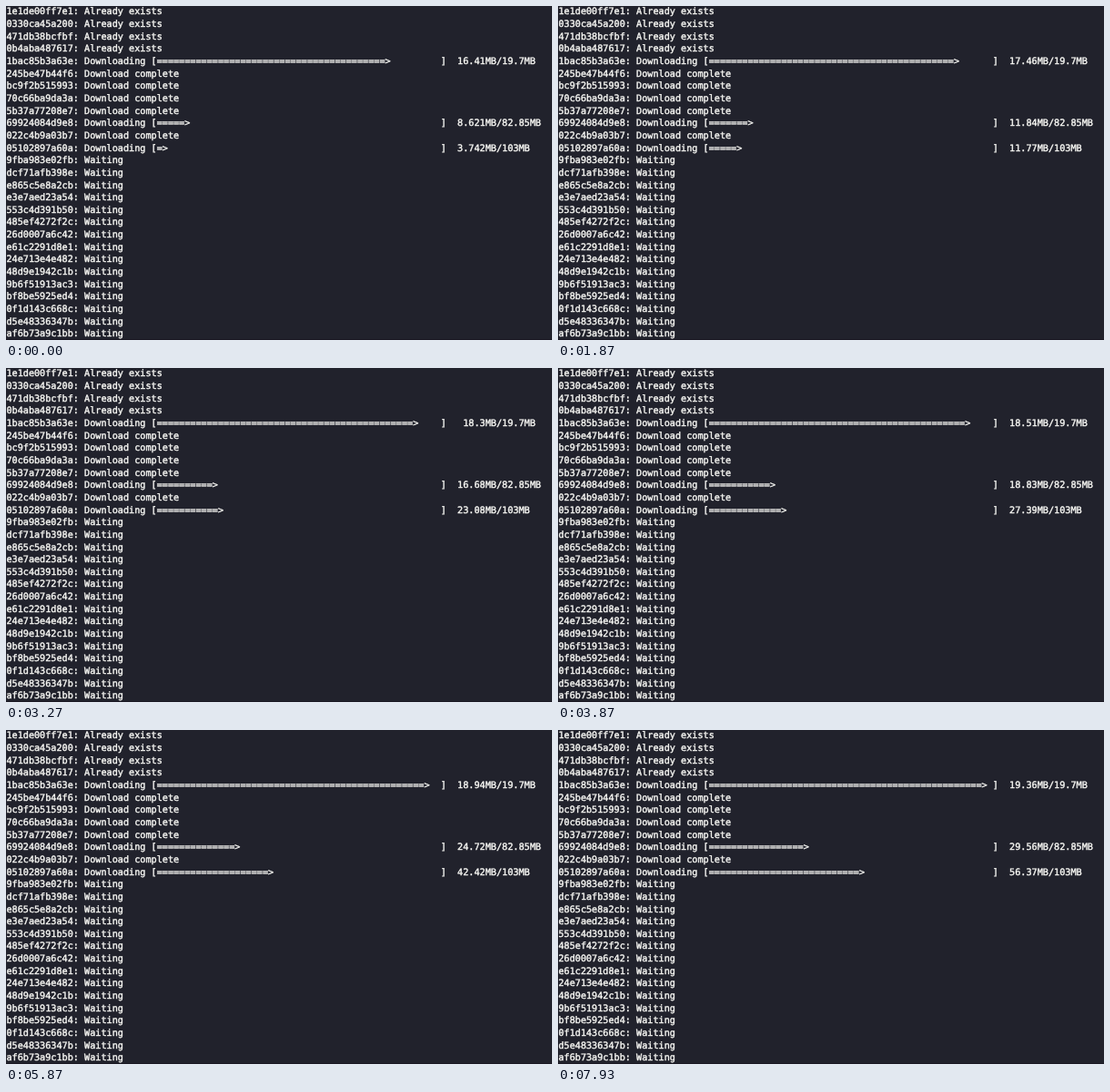
An HTML page with a canvas that plays this animation: 600 by 368 pixels, repeating every 8 s.

```html
<!DOCTYPE html>
<html lang="en">
<head>
<meta charset="utf-8">
<title>Layer downloads</title>
<style>
  html, body { margin: 0; width: 100%; height: 100%; overflow: hidden; background: #21222c; }
  canvas { display: block; }
</style>
</head>
<body>
<canvas id="stage" width="600" height="368"></canvas>
<script>
const ctx = document.getElementById('stage').getContext('2d');
const LOOP = 8000, TICK = 200 / 3;
const CELL = 6.12, LINE = 13.65, LEFT = 0.4, BASE = 9.4;

// Megabytes reached at a few shared moments; between them data arrives chunk by chunk.
const moments = [550, 1870, 2670, 3870, 5870, 7070, 7930];
const downloads = {
  '1bac85b3a63e': { total: 19.7, chunk: 0.21, reached: [16.41, 17.46, 18.1, 18.51, 18.94, 19.36, 19.36] },
  '69924084d9e8': { total: 82.85, chunk: 0.537, reached: [8.621, 11.84, 14.53, 18.83, 24.72, 27.41, 29.56] },
  '05102897a60a': { total: 103, chunk: 0.537, reached: [3.742, 11.77, 18.23, 27.39, 42.42, 50.99, 56.37] }
};

const layers = [
  ['Already exists', '1e1de00ff7e1 0330ca45a200 471db38bcfbf 0b4aba487617'],
  ['Downloading', '1bac85b3a63e'],
  ['Download complete', '245be47b44f6 bc9f2b515993 70c66ba9da3a 5b37a77208e7'],
  ['Downloading', '69924084d9e8'],
  ['Download complete', '022c4b9a03b7'],
  ['Downloading', '05102897a60a'],
  ['Waiting', '9fba983e02fb dcf71afb398e e865c5e8a2cb e3e7aed23a54 553c4d391b50 ' +
    '485ef4272f2c 26d0007a6c42 e61c2291d8e1 24e713e4e482 48d9e1942c1b ' +
    '9b6f51913ac3 bf8be5925ed4 0f1d143c668c d5e48336347b af6b73a9c1bb']
].flatMap(([status, ids]) => ids.split(' ').map(id => ({ id, status })));

function amount({ chunk, reached }, t) {
  const next = moments.findIndex(m => m >= t);
  if (next === 0) return reached[0];
  if (next < 0) return reached.at(-1);
  const from = reached[next - 1], gain = reached[next] - from;
  const chunks = Math.round(gain / chunk) || 1;
  const part = (t - moments[next - 1]) / (moments[next] - moments[next - 1]);
  return from + gain * Math.ceil(part * chunks) / chunks;
}

function progress(item, t) {
  const mb = amount(item, t);
  const filled = Math.floor(mb / item.total * 50);
  const bar = '='.repeat(filled) + '>' + ' '.repeat(50 - filled);
  const size = Number(mb.toPrecision(4)) + 'MB';
  return ` [${bar}] ${size.padStart(8)}/${item.total}MB`;
}

function drawLine(text, row) {
  const y = BASE + row * LINE;
  [...text].forEach((ch, col) => {
    if (ch === ' ') return;
    const x = LEFT + col * CELL;
    ctx.fillText(ch, x, y);
    ctx.strokeText(ch, x, y);
  });
}

function draw(t) {
  ctx.fillStyle = '#21222c';
  ctx.fillRect(0, 0, 600, 368);
  ctx.fillStyle = '#191722';
  ctx.fillRect(0, 367, 600, 1);
  ctx.font = '10.2px "DejaVu Sans Mono", monospace';
  ctx.textRendering = 'geometricPrecision';
  ctx.fillStyle = ctx.strokeStyle = '#f8f8f4';
  ctx.lineWidth = 0.4;
  layers.forEach(({ id, status }, row) => {
    const tail = downloads[id] ? progress(downloads[id], t) : '';
    drawLine(`${id}: ${status}${tail}`, row);
  });
}

const start = performance.now();
let shown = -1;
function frame() {
  const t = (performance.now() - start) % LOOP;
  const tick = Math.floor(t / TICK);
  if (tick !== shown) {
    shown = tick;
    draw(Math.round(tick * TICK / 10) * 10);
  }
  requestAnimationFrame(frame);
}
frame();
</script>
</body>
</html>
```
